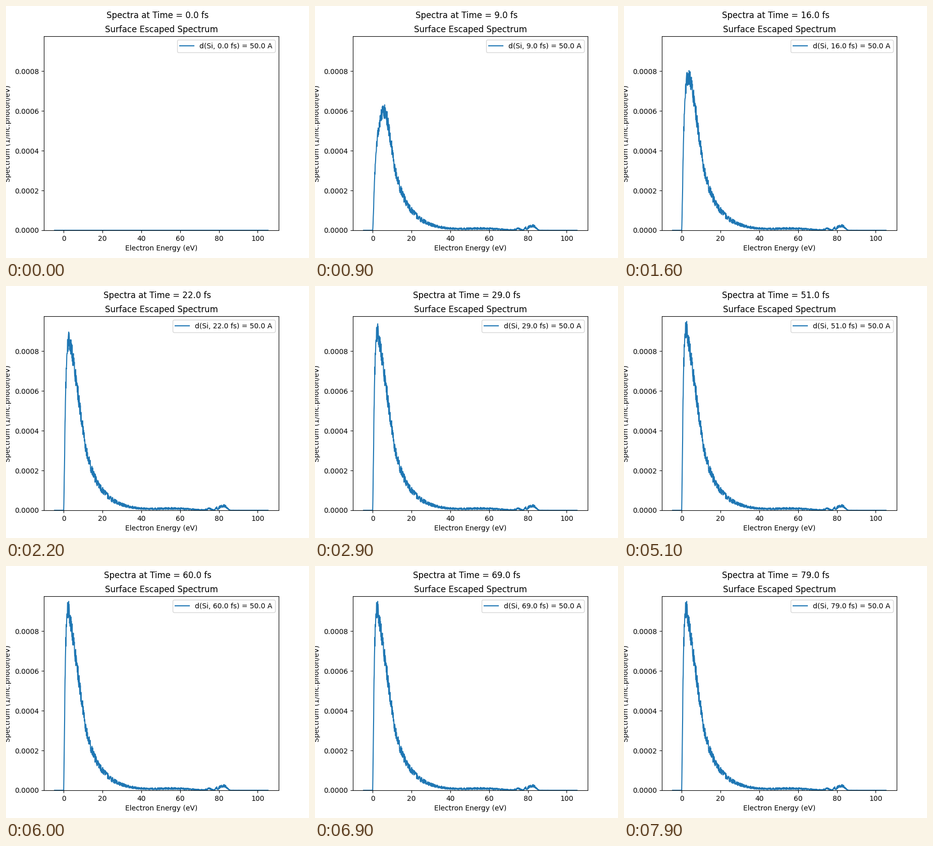
Recreate the animation shown at these times as a matplotlib script. Size 600 px wide and 500 px high, loop 8 s.

```python
import numpy as np
import matplotlib.pyplot as plt
from matplotlib.animation import FuncAnimation

FRAMES = 80
UNIT = 1e-4

energy = np.round(np.arange(-4.7, 105.35, .1), 1)
e = np.maximum(energy, 0)


def bump(center, width, power=2):
    return np.exp(-np.abs((e - center) / width) ** power)


def final_spectrum():
    """Low-energy cascade, weak shoulder and photoelectron lines, with noise."""
    rise = 1 - np.exp(-(e / 1.02) ** 1.3)
    cascade = rise * (12.2 * np.exp(-e / 8) + 1.1 * bump(6.3, 4.3))
    lines = (.08 * bump(57, 12) + .07 * bump(75, 1.6)
             + .12 * bump(78.7, .6) + .21 * bump(82.2, 2.5, 4))
    mean = cascade + lines * (e > 0)
    # Counting noise grows with the square root of the signal
    noise = np.random.default_rng(12).uniform(-.17, .17, e.size)
    return np.maximum(mean + noise * np.sqrt(mean), 0) * UNIT


def escaped(t):
    """Fraction of electrons out by time t; slow ones arrive later."""
    tau = 18.3 * np.exp(-.2 * e) + 10 * np.exp(-e / .2)
    return 1 - np.exp(-(t / tau) ** 1.5)


spectrum = final_spectrum()

fig, ax = plt.subplots(figsize=(6, 5), dpi=100)
line, = ax.plot(energy, 0 * energy, label="d(Si, 0.0 fs) = 50.0 A")
ax.set_xlim(-10.2, 110.82)
ax.set_ylim(0, 9.75 * UNIT)
ax.set_xlabel("Electron Energy (eV)")
ax.set_ylabel("Spectrum (1/inc.photon/eV)")
ax.set_title("Surface Escaped Spectrum")
heading = fig.suptitle("Spectra at Time = 0.0 fs")
label = ax.legend(loc="upper right").get_texts()[0]


def update(i):
    t = float(i)
    line.set_ydata(spectrum * escaped(t))
    heading.set_text(f"Spectra at Time = {t:.1f} fs")
    label.set_text(f"d(Si, {t:.1f} fs) = 50.0 A")
    return line, heading, label


anim = FuncAnimation(fig, update, frames=FRAMES, interval=100,
                     repeat=True, repeat_delay=0, blit=False)
plt.show()
```
